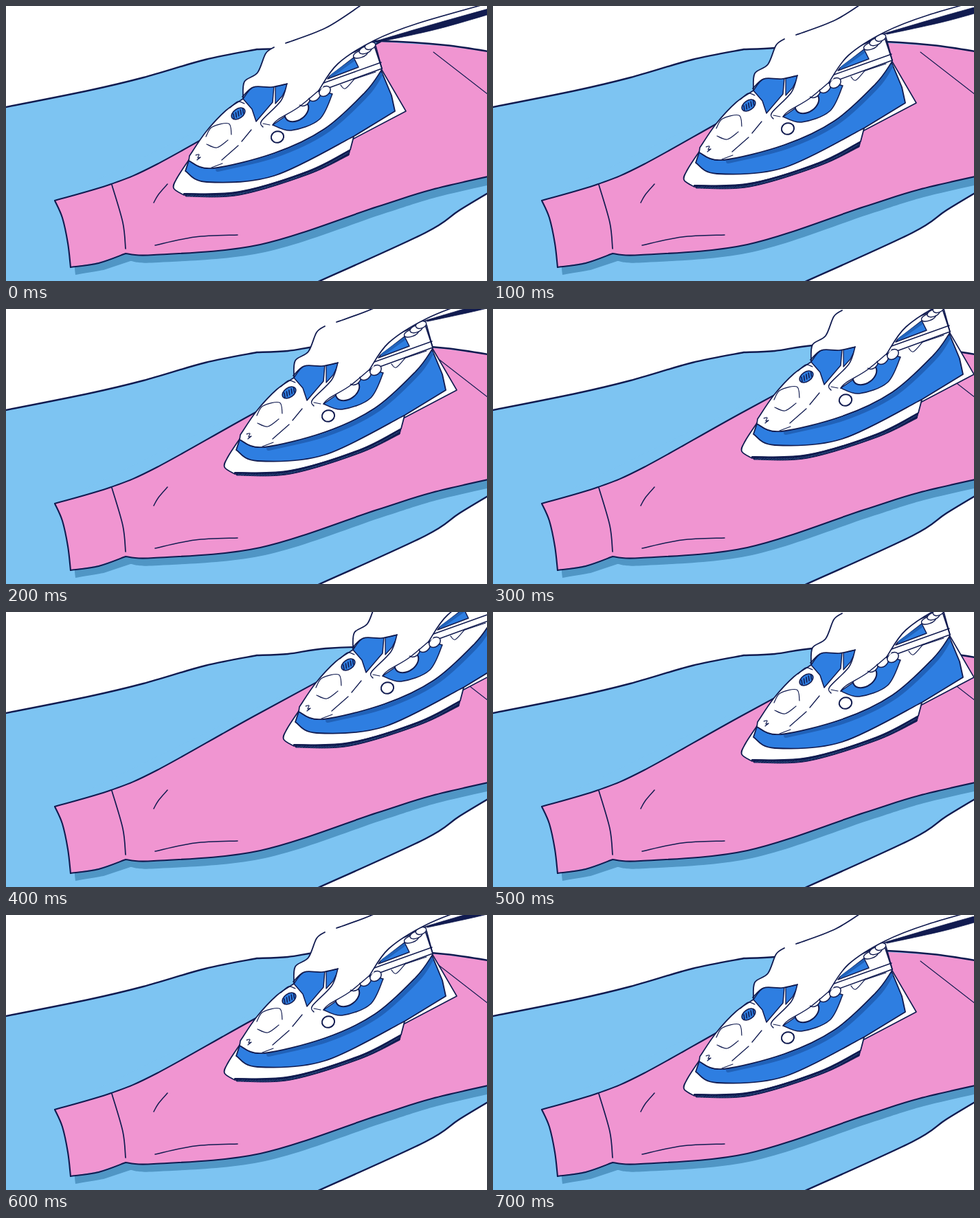
Animation, 700 px wide and 400 px high, one loop 800 ms. Source, as an HTML page:

```html
<!DOCTYPE html>
<html lang="en">
<head>
<meta charset="utf-8">
<title>Ironing a sleeve</title>
<style>
html, body { margin: 0; width: 100%; height: 100%; overflow: hidden; background: #fff; }
svg { display: block; width: 700px; height: 400px; }
</style>
</head>
<body>
<svg viewBox="0 0 700 400" stroke-linecap="round" stroke-linejoin="round">
  <g id="scene"></g>
  <g id="iron"></g>
</svg>
<script>
const INK = '#111b50', WHITE = '#fff', PINK = '#f095d1', SKY = '#7dc4f2';
const SHADOW = '#5096c5', BLUE = '#2e7ee1', DEEP = '#2162b9';
const scene = document.getElementById('scene');
const iron = document.getElementById('iron');
let layer = scene;

// Smooth curve through key points; '|' marks a corner between curves.
function curve(text) {
  let d = '';
  for (const part of text.split('|')) {
    const p = part.trim().split(/\s+/).map(s => s.split(',').map(Number));
    d += (d ? 'L' : 'M') + p[0];
    for (let i = 0; i < p.length - 1; i++) {
      const a = p[i - 1] || p[i], b = p[i], c = p[i + 1], e = p[i + 2] || c;
      const out = b.map((v, k) => v + (c[k] - a[k]) / 6);
      const into = c.map((v, k) => v - (e[k] - b[k]) / 6);
      d += `C${out} ${into} ${c}`;
    }
  }
  return d;
}

const reversed = points => points.split(' ').reverse().join(' ');

function add(tag, attrs) {
  const node = document.createElementNS('http://www.w3.org/2000/svg', tag);
  for (const key in attrs) node.setAttribute(key, attrs[key]);
  layer.appendChild(node);
  return node;
}

function shape(points, fill, width = 0) {
  return add('path', { d: curve(points) + 'Z', fill, stroke: width ? INK : 'none', 'stroke-width': width });
}

function line(points, width = 1.5, stroke = INK) {
  return add('path', { d: curve(points), fill: 'none', stroke, 'stroke-width': width });
}

function oval(x, y, rx, ry, turn, fill, width = 1.5) {
  return add('ellipse', {
    cx: x, cy: y, rx, ry, fill, stroke: INK, 'stroke-width': width,
    transform: `rotate(${turn} ${x} ${y})`
  });
}

// Small seeded generator for the rough texture.
let seed = 7;
const random = () => (seed = seed * 16807 % 2147483647) / 2147483647;

function drawScene() {
  const top = '-5,148 120,123 200,104 290,78 365,63 | 365,63 410,61 465,53 545,51 640,57 720,69';
  const bottom = '715,264 660,297 610,330 450,403';
  shape(`${top} | ${bottom} | -5,403`, SKY);

  const upper = '71,283 153,259 220,230 360,152 545,52';
  const hem = '174,360 215,362 370,347 540,292 620,267 720,244';
  const cuff = '94,380 90,345 82,308 71,283';
  const sleeve = `${upper} | 640,58 720,69 | ${reversed(hem)} | 135,373 94,380 | ${cuff}`;
  shape(sleeve, SHADOW).setAttribute('transform', 'translate(7 11)');
  shape(`${upper} | 465,53 545,51`, SKY);
  shape(sleeve, PINK);

  line(top, 2.4);
  line(bottom, 2.4);
  line(upper, 2.1);
  line(`${cuff}`, 2.1);
  line(`94,380 135,374 174,360 | ${hem}`, 2.1);
  line('154,260 170,315 174,353', 1.7);
  line('215,286 222,274 235,259');
  line('217,348 275,336 337,333');
  line('622,67 702,129', 1.1);
}

function drawPlate() {
  const rim = '259,273 340,270 440,240 501,209';
  shape('547,93 582,153 | 506,193 | 470,160', WHITE, 1.6);
  shape(`266,224 249,250 244,265 259,275 | ${rim} | 506,190 | 400,200`, WHITE, 1.8);
  shape(`${rim} | 499,217 440,245 340,275 262,277`, INK, 1);

  const path = line('264,276 340,273 440,243 497,214', 0);
  const length = path.getTotalLength();
  for (let s = 0; s < length; s += 4) {
    const { x, y } = path.getPointAtLength(s);
    const lean = 1 + random() * 2;
    line(`${x - lean},${y + 1} ${x + lean},${y - 1}`, 0.4, SHADOW);
  }
}

function drawBody() {
  const edge = '546,94 522,126 463,179 390,214 300,236 266,225';
  shape(`${edge} | 261,240 292,256 390,247 507,189 | 566,153 | 561,130 546,94`, BLUE, 1.8);
  line('545,100 524,130 465,183 391,218 308,238', 6, DEEP);
  shape(`${edge} | 267,218 291,183 320,152 345,135 | 400,112 | 535,55 | 547,91`, WHITE, 1.7);

  // Front panel
  line('291,190 300,176 324,171 328,187', 1.2);
  line('323,195 307,206 292,201', 1.2);
  line('314,224 338,203', 1.3);
  line('343,197 357,180', 1.3);
  line('299,235 315,229', 1.2);
  line('326,148 337,139 347,142', 1.2);
  line('276,217 281,216 279,221 283,220 278,224', 1.2);
  oval(395, 190.5, 9.2, 8.2, -15, WHITE, 2);

  // Ribbed dial
  oval(338, 156.5, 11, 7, -35, BLUE);
  for (let i = 0; i < 5; i++) {
    const x = 331 + i * 3.4, y = 157 - i * 2;
    line(`${x},${y} ${x + 1},${y + 7}`, 1.6);
  }
}

function drawHandle() {
  shape('345,135 360,118 390,116 | 388,140 364,168 | 358,150 345,135', BLUE, 1.5);
  shape('392,117 411,113 | 402,131 392,142', BLUE, 1.3);

  // Grip opening
  shape('388,173 415,181 456,165 475,128 | 455,122 410,158', BLUE, 1.5);
  oval(423, 153, 19, 13, -35, WHITE, 2);

  // Rear support
  shape('471,102 506,75 | 513,89 | 468,106', BLUE, 1.5);
  line('474,101 505,79', 4, DEEP);
  line('462,112 546,82');
  line('470,119 547,91');
  line('538,58 547,91', 1.7);
  line('487,115 494,120 508,105', 1.2);
  line('508,106 538,96', 1.1);

  // Cord sleeve
  for (let i = 0; i < 3; i++) {
    oval(516 + i * 7, 70 - i * 6, 11 - i * 1.5, 5, -20, WHITE, 1.4);
  }
}

function drawHand() {
  const wrist = '345,134 347,110 366,97 378,69 390,60';
  const arm = '407,54 465,32 515,0';
  const under = '455,123 483,84 536,50 600,25 720,-9';
  const knuckle = '344,132 360,118 386,118 409,113';
  const thumb = '409,113 400,138 372,167 374,176';
  const palm = '388,173 396,165 426,147 455,123';
  shape(`${wrist} ${arm} | 720,-95 | ${reversed(under)} | ${reversed(palm)} | ${reversed(thumb)} | ${reversed(knuckle)}`, WHITE);

  // Curled fingertips
  for (let i = 0; i < 3; i++) {
    oval(434 + i * 15, 138 - i * 7, 9, 6.5, -35, WHITE);
  }
  shape('420,149 462,118 | 452,112 418,140', WHITE);

  line(wrist, 1.8);
  line(arm, 1.8);
  line(knuckle, 1.7);
  line(thumb);
  line(palm);
  line(under, 1.7);
  line('374,171 384,173', 1.2);
  shape('535,52 620,27 720,-1 | 720,7 630,33 540,53', INK, 0.8);
}

const stops = [[0, 0], [34, -12], [74, -35], [118, -58], [160, -80]];
const STEP = 100, PEAK = stops.length - 1;

// The iron goes up the sleeve and returns through the same stops.
function render(time) {
  const step = Math.floor(time / STEP) % (2 * PEAK);
  const [x, y] = stops[PEAK - Math.abs(step - PEAK)];
  iron.setAttribute('transform', `translate(${x} ${y})`);
}

drawScene();
layer = iron;
drawPlate();
drawBody();
drawHandle();
drawHand();

const start = performance.now();
function tick() {
  render(performance.now() - start);
  requestAnimationFrame(tick);
}
tick();
</script>
</body>
</html>
```
